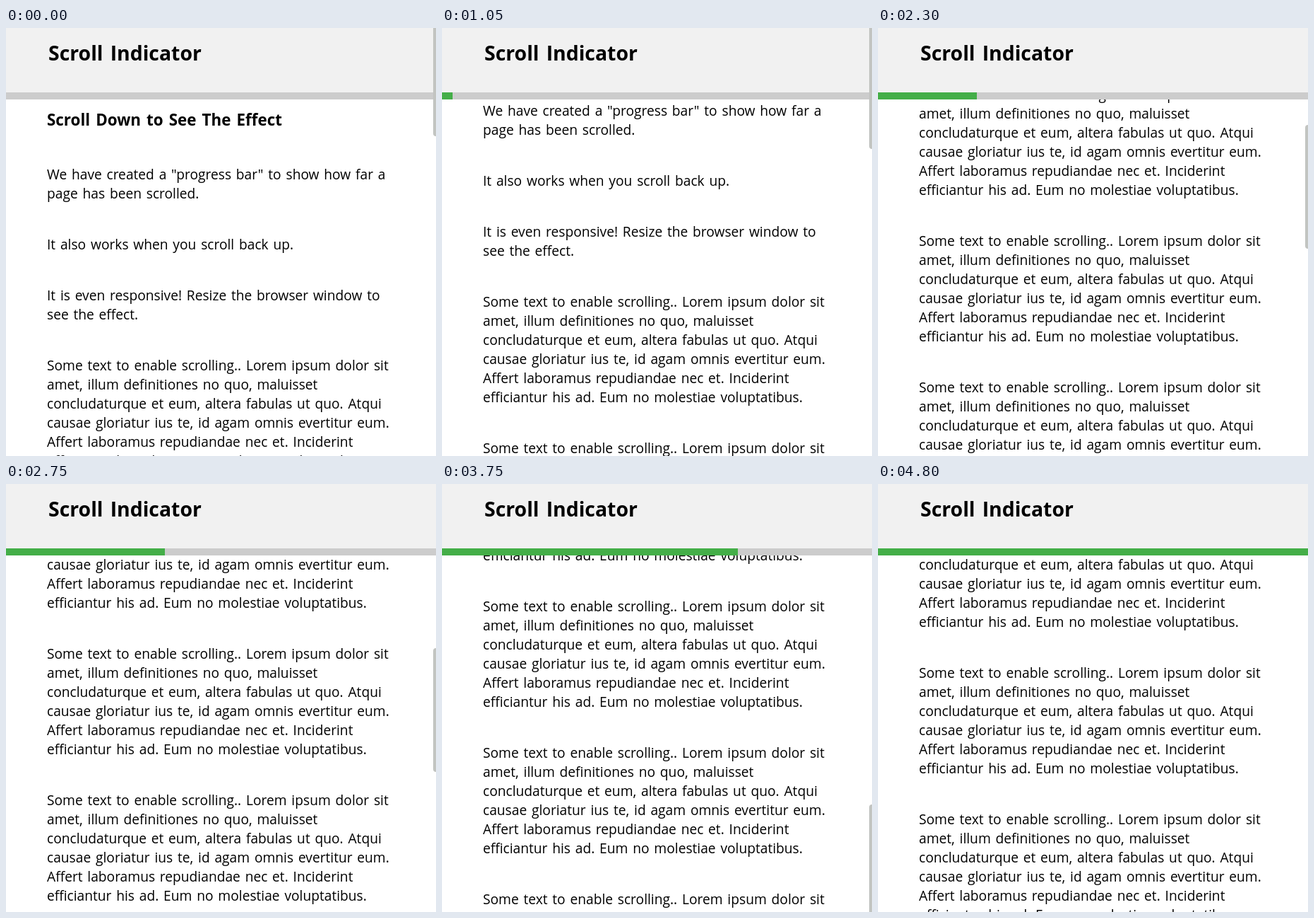
Animation of 609x605 px, one loop 4.85 s. Source, as an HTML page:

```html
<!DOCTYPE html>
<html lang="en">
<head>
<meta charset="utf-8">
<title>Scroll Indicator</title>
<style>
  html, body { margin: 0; width: 100%; height: 100%; overflow: hidden; background: #fff; }
  svg { display: block; }
  text {
    font: 19.2px "Open Sans", "Noto Sans", sans-serif;
    font-variant-ligatures: none;
    word-spacing: 1.8px;
    white-space: pre;
  }
  .title, .subtitle { font-weight: 700; word-spacing: .1em; }
  .title { font-size: 28.4px; }
  .subtitle { font-size: 22.4px; }
</style>
</head>
<body>
<svg width="609" height="605" viewBox="0 0 609 605">
  <g id="page"><text class="subtitle" x="58" y="138">Scroll Down to See The Effect</text></g>
  <rect width="609" height="91" fill="#f1f1f1"/>
  <text class="title" x="60" y="46">Scroll Indicator</text>
  <rect y="91" width="609" height="10" fill="#ccc"/>
  <rect id="bar" y="91" height="10" fill="#44ae48"/>
  <rect id="thumb" x="605" width="12" height="175" rx="4" fill="#c2c4c1"/>
</svg>
<script>
const LOOP = 4850, STEP = 50, LINE = 27, PARAGRAPH = 207;
const [page, bar, thumb] = ["page", "bar", "thumb"].map(id => document.getElementById(id));

function addLines(y, lines) {
  lines.forEach((line, i) => {
    const text = document.createElementNS("http://www.w3.org/2000/svg", "text");
    text.setAttribute("x", 58);
    text.setAttribute("y", y + i * LINE);
    text.textContent = line;
    page.append(text);
  });
}

addLines(214, ['We have created a "progress bar" to show how far a', "page has been scrolled."]);
addLines(313, ["It also works when you scroll back up."]);
addLines(385, ["It is even responsive! Resize the browser window to", "see the effect."]);
const filler = [
  "Some text to enable scrolling.. Lorem ipsum dolor sit",
  "amet, illum definitiones no quo, maluisset",
  "concludaturque et eum, altera fabulas ut quo. Atqui",
  "causae gloriatur ius te, id agam omnis evertitur eum.",
  "Affert laboramus repudiandae nec et. Inciderint",
  "efficiantur his ad. Eum no molestiae voluptatibus."
];
for (let i = 0; i < 19; i++) addLines(484 + i * PARAGRAPH, filler);

// Scroll offset over time: slow start, then a steady pace.
const keys = [[0, 0], [550, 18], [1050, 90], [1650, 259], [1850, 394],
              [2750, 1272], [3350, 1933], [4150, 2814], [4800, 3522]];
const slope = i => (keys[i + 1][1] - keys[i][1]) / (keys[i + 1][0] - keys[i][0]);

function tangent(i) {
  if (i === 0) return 0;
  if (i === keys.length - 1) return slope(i - 1);
  const before = keys[i][0] - keys[i - 1][0], after = keys[i + 1][0] - keys[i][0];
  return (slope(i - 1) * after + slope(i) * before) / (before + after);
}

function scrollAt(t) {
  let i = 0;
  while (i < keys.length - 2 && t >= keys[i + 1][0]) i++;
  const [t0, a] = keys[i], [t1, b] = keys[i + 1];
  const span = t1 - t0, u = (t - t0) / span, v = 1 - u;
  return a * v * v * (1 + 2 * u) + b * u * u * (3 - 2 * u)
       + span * u * v * (tangent(i) * v - tangent(i + 1) * u);
}

function draw(now) {
  const t = Math.floor(now % LOOP / STEP) * STEP;
  const scroll = Math.round(scrollAt(t));
  page.setAttribute("transform", `translate(0 ${-scroll})`);
  bar.setAttribute("width", Math.floor(scroll * 0.1769));
  thumb.setAttribute("y", Math.round(scroll * 0.2 - 22));
}

const start = performance.now();
function tick() {
  draw(performance.now() - start);
  requestAnimationFrame(tick);
}
tick();
</script>
</body>
</html>
```
